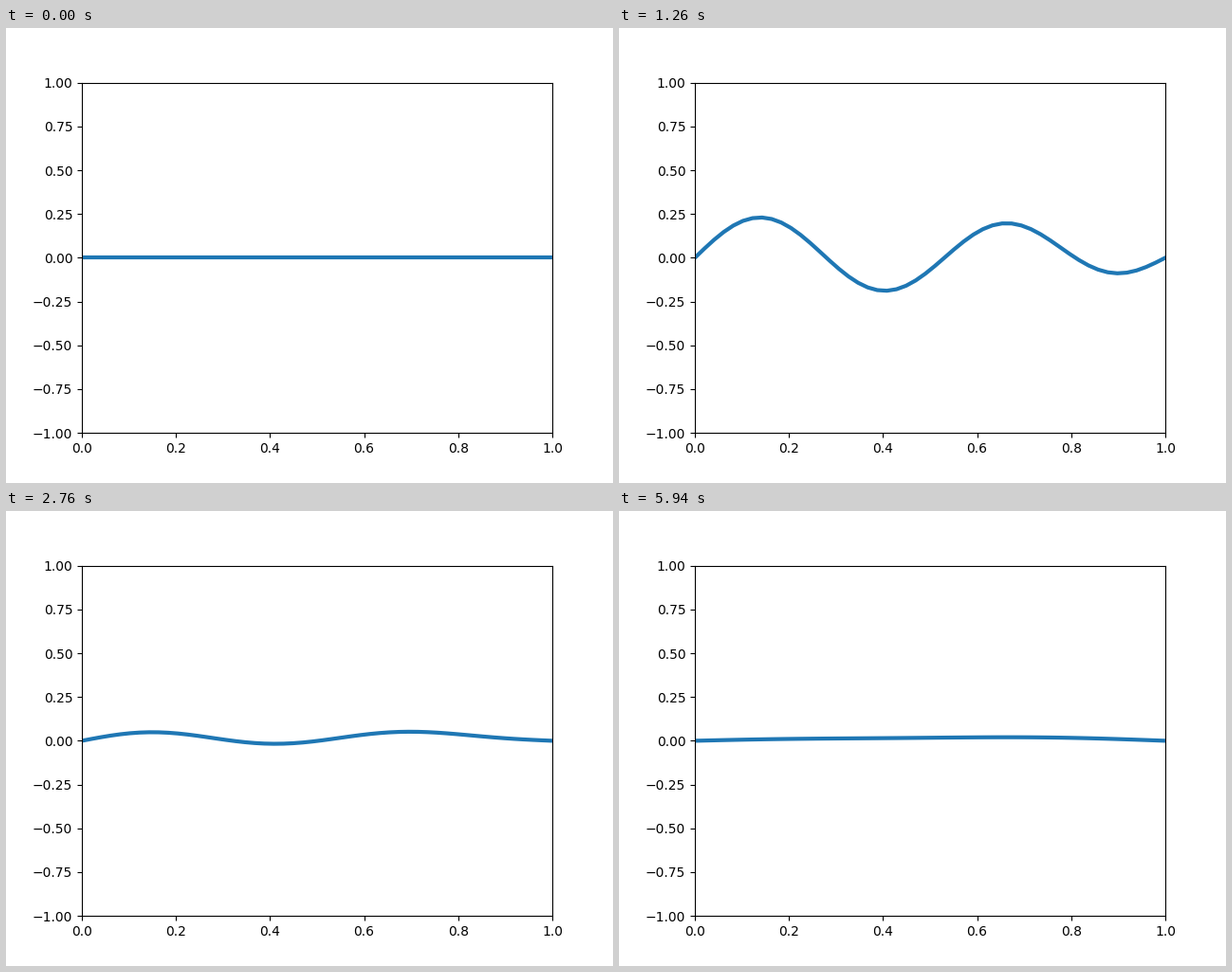
Animation, 640 px wide and 480 px high, one loop 6000 ms. Source, as a matplotlib script:

```python
import numpy as np
import matplotlib.pyplot as plt
from matplotlib.animation import FuncAnimation

FRAMES = 100
INTERVAL = 60
POINTS = 50
DX = 1 / POINTS
DIFFUSION = 5e-4      # per frame
SUBSTEPS = 5
RATIO = DIFFUSION / DX**2 / SUBSTEPS


def diffuse(u):
    """Advance the heat equation by one frame; both ends stay at zero."""
    u = u.copy()
    for _ in range(SUBSTEPS):
        u[1:-1] += RATIO * (u[2:] - 2 * u[1:-1] + u[:-2])
    return u


def solve():
    """Curves for every frame; the first one is the flat line."""
    u = np.zeros(POINTS)
    curves = [u.copy()]
    u[1:-1] = np.sin(4 * np.pi * DX * np.arange(POINTS - 2))
    for _ in range(FRAMES - 1):
        u = diffuse(u)
        curves.append(u)
    return curves


curves = solve()

fig, ax = plt.subplots(figsize=(6.4, 4.8), dpi=100)
ax.set_xlim(0, 1)
ax.set_ylim(-1, 1)
line, = ax.plot(np.linspace(0, 1, POINTS), curves[0], lw=3)


def update(i):
    line.set_ydata(curves[i])
    return line,


anim = FuncAnimation(fig, update, frames=FRAMES, interval=INTERVAL,
                     repeat=True, repeat_delay=0)
plt.show()
```
